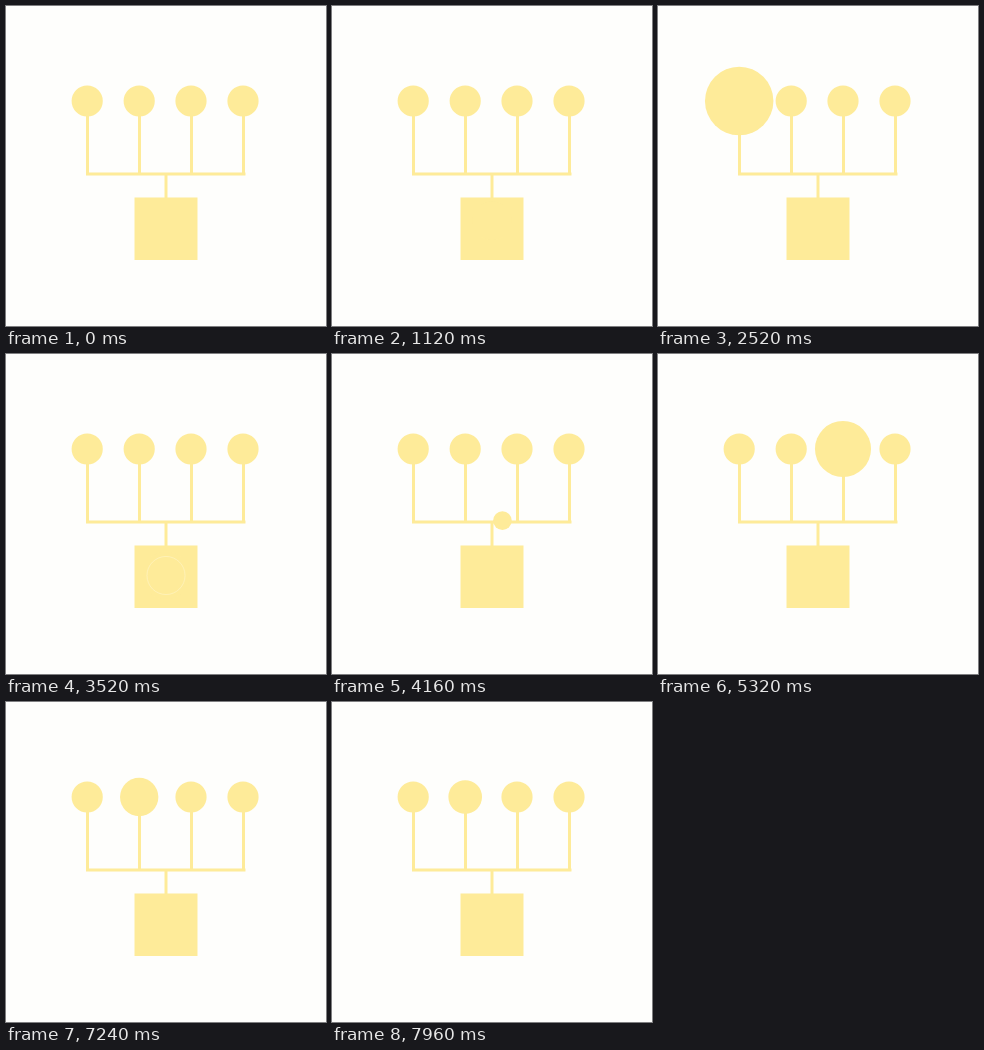
Recreate the animation shown at these times as an HTML page. Size 320 by 320 pixels, loop 8000 ms.

```html
<!DOCTYPE html>
<html lang="en">
<head>
<meta charset="utf-8">
<title>Branching nodes</title>
<style>
  html, body { margin: 0; width: 100%; height: 100%; overflow: hidden; background: #fefefc; }
  svg { display: block; width: 100%; height: 100%; }
</style>
</head>
<body>
<svg viewBox="0 0 320 320" fill="#feeb99">
  <path d="M81.5 95V168M133.5 95V168M185.5 95V168M237.5 95V168M80 168H239.5M160 168V193"
        fill="none" stroke="#feeb99" stroke-width="3"/>
  <rect x="128.5" y="191.5" width="63" height="62.5"/>
  <g id="nodes"></g>
  <circle id="ball"/>
  <circle id="ring" cx="160" cy="221.5" fill="none" stroke="#fff6cc" stroke-width="0.8"/>
</svg>
<script>
const LOOP = 8000, NODE_R = 15.6, PEAK_R = 34.6, BALL_R = 9.3;
const HUB = { x: 160, y: 221.5 }, BUS_Y = 166.6, NODE_Y = 95;
const nodeX = [81.2, 133.2, 185, 237];

// Times in ms: start, leave the hub, along the bus, up the branch, swell
const pulses = [
  { node: 0, start: 960, rise: [1030, 1440], bus: [1430, 1760], climb: [1640, 2205], swell: [2205, 2590] },
  { node: 2, start: 3520, rise: [3600, 4005], bus: [4000, 4365], climb: [4345, 4785], swell: [4780, 5163] },
  { node: 1, start: 5960, rise: [6030, 6425], bus: [6410, 6760], climb: [6745, 7180], swell: [7165, 7546] }
];
const SHRINK = 600, RING = 120;

const svg = document.querySelector("svg");
const ball = document.getElementById("ball");
const ring = document.getElementById("ring");
const nodes = nodeX.map(x => {
  const c = document.createElementNS(svg.namespaceURI, "circle");
  set(c, { cx: x, cy: NODE_Y, r: NODE_R });
  document.getElementById("nodes").append(c);
  return c;
});

function set(el, attrs) {
  for (const k in attrs) el.setAttribute(k, attrs[k]);
}
const mix = (a, b, p) => a + (b - a) * p;
const span = (t, [a, b]) => Math.min(1, Math.max(0, (t - a) / (b - a)));
const smooth = p => p * p * (3 - 2 * p);

// cubic-bezier(1/3, 0, 0.2, 1)
function settle(p) {
  let lo = 0, hi = 1;
  for (let i = 0; i < 20; i++) {
    const s = (lo + hi) / 2, q = 1 - s;
    if (s * q * q + 0.6 * s * s * q + s * s * s < p) lo = s; else hi = s;
  }
  return smooth(lo);
}

function drawBall(p, t) {
  const rise = smooth(span(t, p.rise));
  set(ball, {
    cx: mix(HUB.x, nodeX[p.node] + 0.3, smooth(span(t, p.bus))),
    cy: mix(HUB.y, BUS_Y, rise) + (NODE_Y - BUS_Y) * smooth(span(t, p.climb)),
    r: mix(24, BALL_R, Math.min(1, rise * 2.5)),
    opacity: 1
  });
}

function render(t) {
  set(ball, { opacity: 0 });
  set(ring, { opacity: 0 });
  nodes.forEach(n => set(n, { r: NODE_R }));
  for (const p of pulses) {
    const end = p.swell[1];
    if (t < p.start || t > end + SHRINK) continue;
    if (t < p.climb[1]) drawBall(p, t);
    const age = (t - p.start) / RING;
    if (age < 1) set(ring, { r: mix(19, 24, age), opacity: 0.7 * (1 - age) });
    const size = settle(span(t, p.swell)) - settle(span(t, [end, end + SHRINK]));
    set(nodes[p.node], { r: mix(NODE_R, PEAK_R, size) });
  }
}

const began = performance.now();
function tick() {
  render((performance.now() - began) % LOOP);
  requestAnimationFrame(tick);
}
render(0);
requestAnimationFrame(tick);
</script>
</body>
</html>
```
